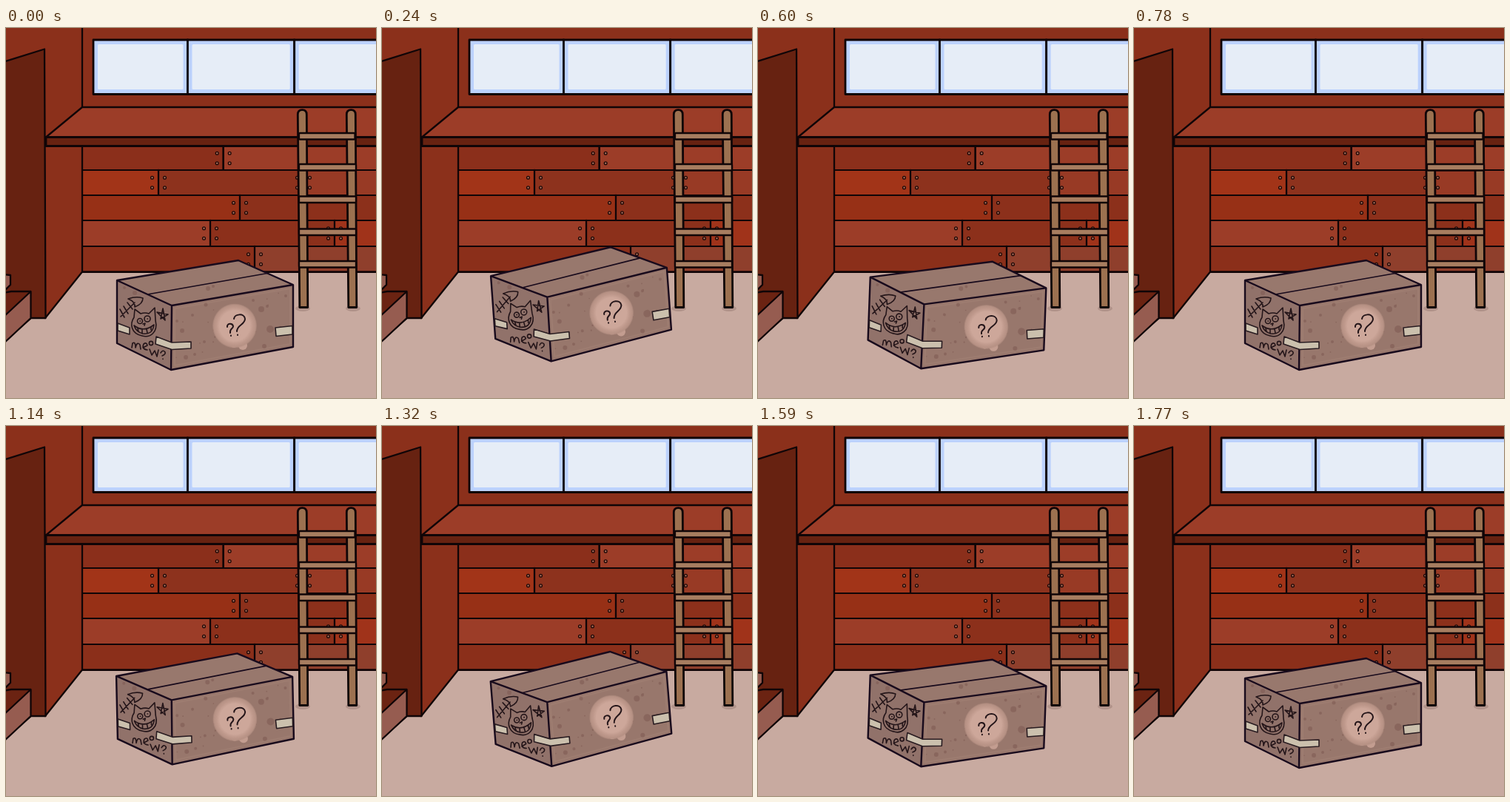
An HTML page that plays this animation: 500 by 500 pixels, repeating every 1.95 s.

```html
<!DOCTYPE html>
<html lang="en">
<head>
<meta charset="utf-8">
<title>Hopping box</title>
<style>
html, body { margin: 0; width: 100%; height: 100%; overflow: hidden; background: #c8aaa0; }
svg { display: block; width: 100vw; height: 100vh; }
.ink { stroke: #100507; stroke-width: 2.3; stroke-linejoin: round; stroke-linecap: round; }
.bold { stroke-width: 2.8; }
.thin { stroke-width: 1.9; }
.edge { stroke: #180a1c; stroke-width: 2.4; stroke-linejoin: round; }
.fold { stroke-width: 1.7; }
.doodle { fill: none; stroke: #241519; stroke-width: 1.6; stroke-linecap: round; stroke-linejoin: round; }
.marker { stroke-width: 2; }
.tape { fill: #cbc0ad; stroke: #281b20; stroke-width: 1.6; stroke-linejoin: round; }
</style>
</head>
<body>
<svg viewBox="0 0 500 500" preserveAspectRatio="none">
  <defs>
    <radialGradient id="glow">
      <stop offset=".68" stop-color="#cda79a"/>
      <stop offset=".82" stop-color="#bf998c"/>
      <stop offset=".94" stop-color="#b69184"/>
      <stop offset="1" stop-color="#b69184" stop-opacity=".3"/>
    </radialGradient>
  </defs>

  <rect width="500" height="500" fill="#c8aaa0"/>
  <path fill="#8b301b" d="M0 0H500V330H103L53 392H0Z"/>

  <g id="window"></g>

  <g id="planks"></g>
  <path class="ink" fill="none" d="M103 0V107M103 160V329.500L53 392M103 329.500H500"/>
  <path class="ink" fill="#9c3d28" d="M103 107H504V147.500H54Z"/>
  <path class="ink bold" fill="#672211" d="M54 147.500H504V159.500H54Z"/>

  <path class="ink" fill="#672211" d="M-4 46L52 28.500L53.500 392H34L-4 425Z"/>
  <path class="ink" fill="#6b2312" d="M-4 358L7 356H33V360L-4 391Z"/>
  <path class="ink" fill="#965c50" d="M-4 333L6 334V347L-4 357Z"/>
  <path class="ink" fill="#965c50" d="M-4 391L33.500 356V392L-4 427Z"/>

  <g id="ladder"></g>

  <g id="box">
    <path fill="#98786d" d="M150 341L314 314L388 347L224 375Z"/>
    <path fill="#91726a" d="M150 341L224 375L223 462L150 426Z"/>
    <path fill="#98776c" d="M224 375L388 347V431L223 462Z"/>
    <path d="M228 379L384 352V427L228 456Z" fill="none" stroke="#9e7d71" stroke-width="2"/>
    <g id="spots" fill="#7d5a52"></g>
    <g fill="#c39d90">
      <circle cx="308" cy="428" r="4"/><circle cx="320" cy="429" r="6"/>
    </g>
    <circle cx="309" cy="402.500" r="30" fill="url(#glow)"/>
    <path class="doodle marker" d="M299 404C298 399 306 398 307 403C307 407 302 406 303 412M304 415.500V416
      M308 393C309 386 322 385 323 393C323 401 312 401 312 410M313 414.500V415"/>

    <path class="edge" fill="none" d="M150 341L314 314L388 347V431L223 462L150 426ZM150 341L224 375L388 347M224 375L223 462"/>
    <path class="edge fold" fill="none" d="M191 360L353 331.500"/>
    <path class="tape" d="M151 399L167 405V414L151 409Z"/>
    <path class="tape" d="M203 417L224 425L250 424V433L224 434.500L202 427Z"/>
    <path class="tape" d="M387 402.500L364 405L365 416.500L387 414Z"/>

    <g class="doodle">
      <path d="M155 390L174 371M154 380L160 391M159 376L165 386M164 371L171 380M165 366Q176 362 185 365Q185 373 174 377Q175 370 165 366"/>
      <path d="M209 393L212 379L215 395L204 384L219 387Z"/>
      <path d="M173 391L174 380L182 386Q188 384 193 386L201 378L202 395
               C206 412 194 419 184 416C169 413 167 400 173 391Z"/>
      <circle cx="181" cy="396" r="3.500"/><circle cx="191" cy="393" r="4"/>
      <path d="M181 396h.5M191 393h.5M185 400L188 399L187 402
               M173 402Q186 412 200 401Q198 415 185 413Q176 411 173 402
               M178 406L179 410M184 408V413M190 407L191 412M196 404L196 408"/>
      <path d="M170 432L171 426Q175 423 175 432Q177 423 181 428L182 434
               M185 432L191 429Q190 424 186 427Q183 434 191 435"/>
      <circle cx="196" cy="426" r="2.600"/>
      <path d="M194 434L197 442L201 436L204 444L206 435M209 439Q212 434 215 438Q216 441 211 443M212 447V447.500"/>
    </g>
  </g>
</svg>
<script>
const $ = id => document.getElementById(id);
const add = (id, markup) => $(id).insertAdjacentHTML("beforeend", markup);
const rect = (x, y, w, h, fill, extra = "") =>
  `<rect x="${x}" y="${y}" width="${w}" height="${h}" fill="${fill}" ${extra}/>`;

// Window panes
[[118, 245.5], [245.5, 389.7], [389.7, 520]].forEach(([l, r]) => {
  add("window", rect(l, 16, r - l, 73.5, "#bcd2fd", 'class="ink bold"'));
  add("window", rect(l + 6, 22, r - l - 12, 61, "#e6edf7", 'rx="1.5"'));
});

// Each row: top, bottom, joints, board colours
const rows = [
  [160, 192, [293.7], ["#8b2f1b", "#9c3d28"]],
  [192, 226, [206, 402], ["#a23418", "#8d321d", "#983a25"]],
  [226, 260, [316], ["#973016", "#8c301b"]],
  [260, 295, [276, 444], ["#9c3d28", "#8c301b", "#a0331a"]],
  [295, 330, [336], ["#8b2f1a", "#8f3f2c"]]
];
rows.forEach(([top, bottom, joints, fills]) => {
  const ends = [103, ...joints, 504];
  const mid = (top + bottom) / 2;
  fills.forEach((fill, i) =>
    add("planks", rect(ends[i], top, ends[i + 1] - ends[i], bottom - top, fill, 'class="ink thin"')));
  joints.forEach(x => {
    add("planks", `<path class="ink" d="M${x} ${top}V${bottom}"/>`);
    for (const dx of [-8.5, 8.5]) for (const dy of [-6.7, 6.7])
      add("planks", `<circle cx="${x + dx}" cy="${mid + dy}" r="1.9" fill="#a66a58" stroke="#1c0806" stroke-width="1.3"/>`);
  });
});

// Ladder
for (const x of [401, 469]) add("ladder", `<ellipse cx="${x}" cy="379" rx="10" ry="4" fill="#b1938a"/>`);
for (const x of [394.3, 460.3])
  add("ladder", `<path class="ink bold" fill="#9c7150" d="M${x} 117Q${x} 110.700 ${x + 6} 110.700T${x + 12} 117L${x + 13.5} 377.500H${x + 2.5}Z"/>`);
[142, 184, 227.5, 271.5, 315].forEach((y, i) =>
  add("ladder", rect(396, y, i ? 77 : 75.5, 8.5, "#a77d60", 'class="ink" rx="1"')));

// Stains: x, y, radius
const stains = [
  [273, 352, 3], [280, 349, 2], [345, 380, 4], [353, 376, 2], [270, 374, 2.5], [252, 388, 2],
  [238, 409, 3], [243, 445, 3], [255, 441, 2], [357, 407, 5], [349, 430, 3], [378, 362, 2],
  [268, 424, 2], [160, 351, 2], [174, 358, 3], [231, 396, 2], [334, 368, 2]
];
let seed = 7;
const rand = () => (seed = seed * 16807 % 2147483647) / 2147483647;
for (let i = 0; i < 22; i++) {
  const u = rand();
  stains.push([230 + u * 152, 379 - u * 27 + rand() * 72, 0.6 + rand() * 0.6]);
}
stains.forEach(([x, y, r]) =>
  add("spots", `<circle cx="${x}" cy="${y}" r="${r}" opacity=".55"/>`));

// Two high hops leaning left, a short tilt right, then a small settling hop
function pose(t) {
  if (t <= 0 || t >= 660) return [0, 0];
  const wave = x => Math.sin(Math.PI * x);
  if (t < 480) {
    const lift = 14.7 * Math.abs(wave(t / 240));
    const tilt = t < 360 ? -4.8 * wave(t / 360) : 2.1 * wave((t - 360) / 240);
    return [lift, tilt];
  }
  if (t <= 510) return [0, 2.1];
  const u = (t - 510) / 150;
  return [4 * wave(u), 1.05 * (1 + Math.cos(Math.PI * u))];
}

const LOOP = 1950, STEP = 30, STARTS = [120, 1110];

function draw(ms) {
  const t = Math.floor((ms % LOOP) / STEP) * STEP;
  const start = t < STARTS[1] ? STARTS[0] : STARTS[1];
  const [lift, tilt] = pose(t - start);
  $("box").setAttribute("transform", `translate(0 ${-lift}) rotate(${tilt} 269 386)`);
}

const origin = performance.now();
function tick() {
  draw(performance.now() - origin);
  requestAnimationFrame(tick);
}
draw(0);
tick();
</script>
</body>
</html>
```
